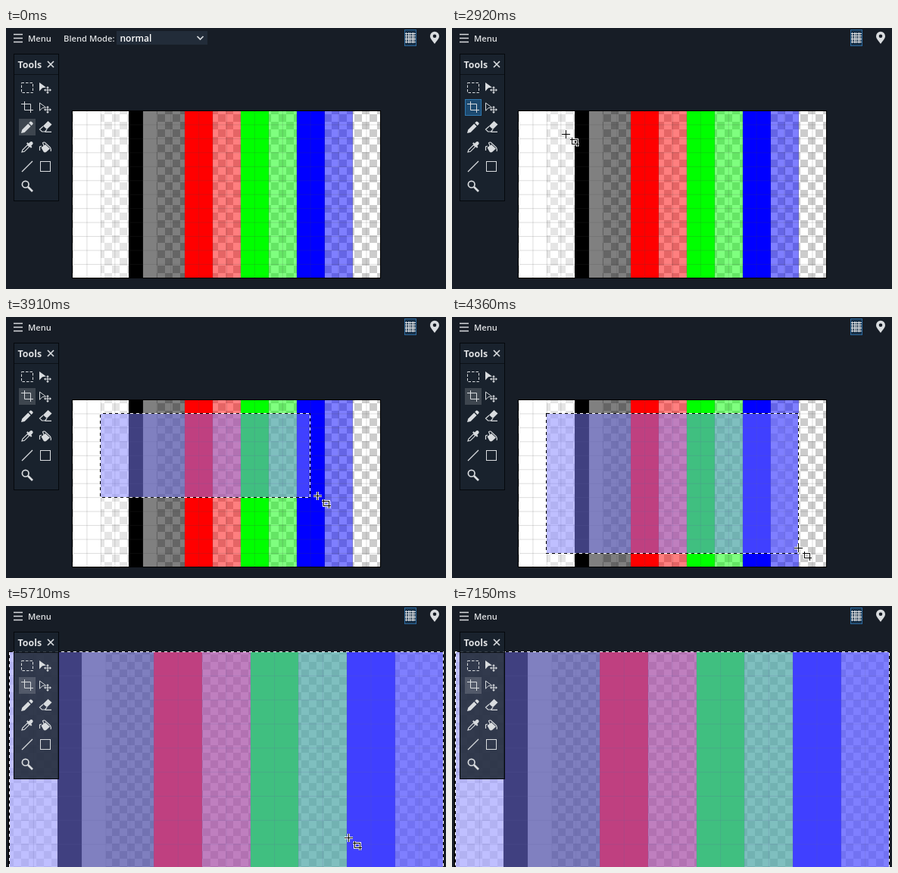
Recreate the animation shown at these times as an HTML page. Size 581 px wide and 345 px high, loop 7250 ms.

```html
<!DOCTYPE html>
<html lang="en">
<head>
<meta charset="utf-8">
<title>Crop tool</title>
<style>
html, body { margin: 0; width: 100%; height: 100%; overflow: hidden; background: #171d26; }
svg { display: block; width: 100vw; height: 100vh; }
text { font-family: "Open Sans", "Noto Sans", sans-serif; fill: #dcdee0; font-size: 11.2px; font-weight: 600; white-space: pre; }
.crisp { shape-rendering: crispEdges; }
.line { fill: none; stroke: #d9dcdf; stroke-width: 1.2; }
.thin { stroke-width: 1; }
.thick { stroke-width: 1.7; }
.heavy { stroke-width: 2.6; }
.solid { fill: #d9dcdf; }
.ants { fill: none; stroke-width: 1; }
</style>
</head>
<body>
<svg viewBox="0 0 581 345">
  <defs>
    <pattern id="checks" width="20" height="20" patternUnits="userSpaceOnUse" patternTransform="translate(0 4)">
      <rect width="20" height="20" fill="#fff"/>
      <path d="M10 0h10v10h-10zM0 10h10v10h-10z" fill="#ccc"/>
    </pattern>
    <clipPath id="clip"><rect id="clipBox"/></clipPath>
    <path id="four" d="M0-5l2 2.3h-1.4v2.1h2.1v-1.4l2.3 2l-2.3 2v-1.4h-2.1v2.1h1.4l-2 2.3l-2-2.3h1.4v-2.1h-2.1v1.4l-2.3-2l2.3-2v1.4h2.1v-2.1h-1.4z"/>
  </defs>
  <rect width="581" height="345" fill="#171d26"/>

  <rect id="frame" class="crisp" fill="none" stroke="#000"/>
  <g clip-path="url(#clip)">
    <rect class="crisp" width="581" height="345" fill="url(#checks)"/>
    <g id="cells"></g>
  </g>
  <g id="selection" class="crisp">
    <rect class="sel" fill="#8080ff" fill-opacity=".5"/>
    <rect class="sel ants" stroke="#000"/>
    <rect class="sel ants" id="dashes" stroke="#fff" stroke-dasharray="4 4"/>
  </g>

  <path class="line thick" d="M10 8.5h12M10 13.5h12M10 18.5h12"/>
  <text x="29" y="17.5">Menu</text>
  <g id="mode">
    <text x="76" y="17.5">Blend Mode:</text>
    <rect x="146" y="4" width="120" height="18" fill="#222c39"/>
    <text x="150.5" y="17.5" style="font-size:12px;fill:#fff">normal</text>
    <path class="line thick" d="M252.5 11l4 4l4-4"/>
  </g>
  <rect x="526.5" y="2.5" width="15" height="21" fill="#183149" stroke="#2d6a9e"/>
  <path class="line thin crisp" id="mesh"/>
  <path class="solid" fill-rule="evenodd" d="M566 21c-3-4-6-7-6-10.2a6 6 0 0 1 12 0c0 3.2-3 6.2-6 10.2zM566 8.5a2.3 2.3 0 1 0 0 4.6a2.3 2.3 0 1 0 0-4.6z"/>

  <rect x="10.5" y="34.5" width="59" height="194" fill="#1b242e" fill-opacity=".85" stroke="#05080c"/>
  <path d="M11 61.5h58" stroke="#0c1117"/>
  <text x="15.5" y="52.7" style="font-size:12.4px;font-weight:700">Tools</text>
  <path class="line thick" d="M55 44l8 8M63 44l-8 8"/>
  <rect id="hover" width="22" height="22" fill="#fff" fill-opacity=".07"/>
  <rect id="active" x="17" width="22" height="22" fill="#fff" fill-opacity=".16"/>
  <rect id="focus" x="17.5" y="94.5" width="21" height="21" fill="#1d4a70" stroke="#2f78b0"/>

  <g id="icons">
    <rect class="line thin" x="20.5" y="72.5" width="15" height="13" stroke-dasharray="3.5 2"/>
    <path class="solid" d="M44 72l9 6.5l-5 .8l-4 4.2z"/>
    <use class="solid" href="#four" x="55" y="82"/>
    <path class="line thin" d="M24.5 97v11.5h11.5M20 100.5h12.5v11.5"/>
    <path class="line thin" d="M44.5 99l8 6l-4.7 .8l-3.3 3.5z"/>
    <use class="solid" href="#four" x="55" y="108"/>
    <path class="solid" d="M20 139l1.200-4.500l8-8l3.400 3.400l-8 8zM30.200 125.500l1.700-1.700q1-.8 2 .1l1.400 1.400q.8 1 0 2l-1.700 1.600z"/>
    <path class="solid" d="M49 129.500l6.500-6.500l5 4.500l-6.500 6.500z"/>
    <path class="line" d="M49 130l-4.500 4l3 3h4l2.500-3M51.500 137.400h8.500"/>
    <path class="line" d="M21 164l1-3l6.500-6.500l2.300 2.300l-6.500 6.500z"/>
    <path class="solid" d="M27 152.500l1.500-1.300l1.500 1.200l2-2q1.500-1 3 .4q1.300 1.500 .2 3l-2 2l1.200 1.500l-1.400 1.500z"/>
    <path class="solid" d="M46.500 158l5.500-4l6 5.500l-5 4.500q-2 1-3.500-.5z"/>
    <path class="line" d="M51 158l-2.500-6q2-2 3.500 0l6.500 6q1.500 3 .5 5M47 156l-2.500 1v5"/>
    <path class="line" d="M21 190l14-14"/>
    <rect class="line thin" x="45.5" y="176.5" width="13" height="13"/>
    <circle class="line thick" cx="25.7" cy="206.7" r="4.3"/>
    <path class="line heavy" d="M29 210l6 6"/>
  </g>

  <g id="tip">
    <rect x="37.5" y="123.5" width="59" height="24" fill="#2b2b2b" stroke="#646464"/>
    <text x="44.5" y="139.5" style="font-size:11.5px;font-weight:400">Crop (C)</text>
  </g>
  <path id="arrow" d="M0 0v16.500l3.800-3.600l2.600 6l3-1.300l-2.600-5.800h5.200z" fill="#fff" stroke="#111"/>
  <g id="cropper" fill="none" class="crisp">
    <path class="mark" stroke="#fff" stroke-width="3"/>
    <path class="mark" stroke="#000"/>
  </g>
</svg>
<script>
const LOOP = 7250, CLICK = 2100, PRESS = 3420, DRAG = 3500, ZOOM = 5320;
const $ = id => document.getElementById(id);
const set = (el, attrs) => { for (const k in attrs) el.setAttribute(k, attrs[k]); };
const show = (id, on) => set($(id), { display: on ? 'inline' : 'none' });
const box = (x, y, width, height) => ({ x, y, width, height });

// Cell geometry before and after cropping
const FULL = { x: 88.5, y: 109.5, cell: 18.45, col: 0, row: 0, cols: 22, rows: 12 };
const CROPPED = { x: 4.5, y: 60.5, cell: 31.83, col: 2, row: 1, cols: 18, rows: 10 };

// Column, width in cells, colour, opacity
const stripes = [
  [0, 2, '#fff', 1], [2, 2, '#fff', .5], [4, 1, '#000', 1], [5, 1, '#808080', 1], [6, 2, '#000', .5],
  [8, 2, '#f00', 1], [10, 2, '#f00', .5], [12, 2, '#0f0', 1], [14, 2, '#0f0', .5],
  [16, 2, '#00f', 1], [18, 2, '#00f', .5]
];
let grid = '';
for (let i = 1; i < 22; i++) grid += `M${i} 0V12`;
for (let i = 1; i < 12; i++) grid += `M0 ${i}H22`;
$('cells').innerHTML = stripes.map(([x, w, c, o]) =>
  `<rect class="crisp" x="${x}" width="${w}" height="12" fill="${c}" fill-opacity="${o}"/>`).join('') +
  `<path d="${grid}" stroke="#444" stroke-opacity=".18" vector-effect="non-scaling-stroke"/>`;

let mesh = '';
for (let i = 0; i < 5; i++) mesh += `M${528.5 + i * 3 - i * .5} 6v14M527 ${7.5 + i * 2.75}h14`;
set($('mesh'), { d: mesh });
document.querySelectorAll('.mark').forEach(el => set(el, {
  d: 'M-5 .5h11M.5-5v11M8.500 5v8h9M6 7.500h9.500v9.500'
}));

// Pointer path: time, x, y
const path = [
  [460, 479, 197], [550, 350, 118], [640, 225, 82], [730, 140, 80], [820, 66, 46], [910, 30, 70],
  [990, 12, 96], [1080, 28, 108], [2010, 28, 108], [2100, 36, 116], [2260, 90, 175], [2420, 140, 203],
  [2560, 165, 180], [2660, 160, 156], [2760, 158, 152], [2920, 150, 140], [3100, 136, 131],
  [3300, 127, 129], [3500, 127, 130], [3640, 220, 160], [3780, 330, 205], [3910, 411, 236],
  [4050, 440, 275], [4180, 457, 299], [4300, 458, 305], [4600, 452, 306], [5830, 452, 306],
  [6490, 600, 365]
];

function pointer(t) {
  const i = path.findIndex(p => p[0] > t);
  if (i < 1) return null;
  const [t0, x0, y0] = path[i - 1], [t1, x1, y1] = path[i];
  const k = (t - t0) / (t1 - t0);
  return [x0 + (x1 - x0) * k, y0 + (y1 - y0) * k];
}

function drawPicture(v) {
  const left = Math.floor(v.x), top = Math.ceil(v.y);
  const right = Math.floor(v.x + v.cols * v.cell), bottom = Math.floor(v.y + v.rows * v.cell);
  set($('clipBox'), box(left, top, right - left, bottom - top));
  set($('frame'), box(left - .5, top - .5, right - left + 1, bottom - top + 1));
  set($('cells'), {
    transform: `translate(${v.x - v.col * v.cell} ${v.y - v.row * v.cell}) scale(${v.cell})`
  });
}

function drawSelection(t, v, p) {
  show('selection', t >= DRAG);
  if (t < DRAG) return;
  let { x, y, cols, rows } = v;
  if (v === FULL) {
    const snap = (a, o) => Math.floor((a - o) / v.cell + .48);
    cols = Math.max(0, snap(p[0], v.x) - 2);
    rows = Math.max(0, snap(p[1], v.y) - 1);
    x += 2 * v.cell;
    y += v.cell;
  }
  const area = box(Math.round(x) - .5, Math.round(y) - .5, Math.ceil(cols * v.cell), Math.ceil(rows * v.cell));
  document.querySelectorAll('.sel').forEach(el => set(el, area));
  set($('dashes'), { 'stroke-dashoffset': -Math.floor(t / 83) % 8 });
}

function drawPointer(t, p) {
  const onPanel = p && p[0] < 70 && p[1] < 229;
  const crop = p && t >= CLICK && !onPanel;
  show('arrow', p && !crop);
  show('cropper', crop);
  if (p) {
    const at = { transform: `translate(${Math.round(p[0])} ${Math.round(p[1])})` };
    set($('arrow'), at);
    set($('cropper'), at);
  }
  const col = p ? Math.floor((p[0] - 16) / 24) : -1;
  const row = p ? Math.floor((p[1] - 66) / 26) : -1;
  const over = onPanel && col >= 0 && col < 2 && row >= 0 && row < 6;
  show('hover', over);
  if (over) set($('hover'), { x: 17 + col * 24, y: 68 + row * 26 });
}

function draw(t) {
  const v = t < ZOOM ? FULL : CROPPED, p = pointer(t);
  drawPicture(v);
  drawSelection(t, v, p);
  drawPointer(t, p);
  show('mode', t < CLICK);
  show('tip', t >= 1600 && t < 2010);
  show('focus', t >= CLICK && t < PRESS);
  show('active', t < CLICK || t >= PRESS);
  set($('active'), { y: t < CLICK ? 120 : 94 });
}

const start = performance.now();
function tick() {
  draw((performance.now() - start) % LOOP);
  requestAnimationFrame(tick);
}
tick();
</script>
</body>
</html>
```
